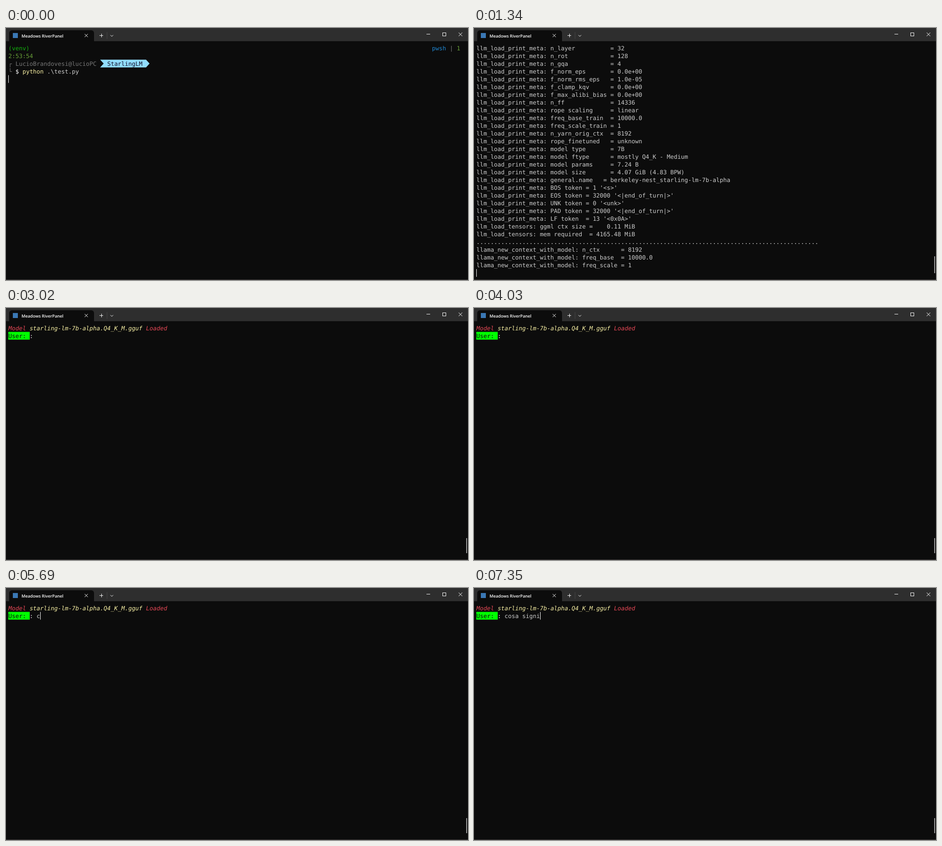
An HTML page with a canvas for the animation above (8000 ms loop, 1013x553 px).

```html
<!DOCTYPE html>
<html lang="en">
<head>
<meta charset="utf-8">
<title>Terminal</title>
<style>
html, body { margin: 0; width: 100%; height: 100%; overflow: hidden; background: #0c0c0c; }
canvas { display: block; width: 1013px; height: 553px; }
</style>
</head>
<body>
<canvas id="stage" width="1013" height="553"></canvas>
<script>
const ctx = document.getElementById('stage').getContext('2d');
const LOOP = 8000;
const LEFT = 5.2, TOP = 35.4, CELL = 7.74, ROW = 17.02;
const MONO = '12.856px "DejaVu Sans Mono", "Noto Sans Mono", monospace';
const BG = '#0c0c0c', FG = '#cccccc', GRAY = '#767676', RED = '#e74856',
      YELLOW = '#f9f1a5', OLIVE = '#689f38', SKY = '#91ddff';

const params = [
  'n_ctx_train=8192', 'n_embd=4096', 'n_head=32', 'n_head_kv=8', 'n_layer=32',
  'n_rot=128', 'n_gqa=4', 'f_norm_eps=0.0e+00', 'f_norm_rms_eps=1.0e-05',
  'f_clamp_kqv=0.0e+00', 'f_max_alibi_bias=0.0e+00', 'n_ff=14336',
  'rope scaling=linear', 'freq_base_train=10000.0', 'freq_scale_train=1',
  'n_yarn_orig_ctx=8192', 'rope_finetuned=unknown', 'model type=7B',
  'model ftype=mostly Q4_K - Medium', 'model params=7.24 B',
  'model size=4.07 GiB (4.83 BPW)'
].map(p => {
  const [key, value] = p.split('=');
  return key.padEnd(16) + ' = ' + value;
});
const tokens = [
  'general.name   = berkeley-nest_starling-lm-7b-alpha',
  "BOS token = 1 '<s>'",
  "EOS token = 32000 '<|end_of_turn|>'",
  "UNK token = 0 '<unk>'",
  "PAD token = 32000 '<|end_of_turn|>'",
  "LF token  = 13 '<0x0A>'"
];
const log = [
  ...[...params, ...tokens].map(s => 'llm_load_print_meta: ' + s),
  'llm_load_tensors: ggml ctx size =    0.11 MiB',
  'llm_load_tensors: mem required  = 4165.48 MiB',
  '.'.repeat(97),
  ...['n_ctx      = 8192', 'freq_base  = 10000.0', 'freq_scale = 1']
    .map(s => 'llama_new_context_with_model: ' + s)
];

const question = 'cosa signi';
const keys = [[5690, 1], [6020, 4], [6360, 6], [6690, 7], [7020, 9], [7350, 10]];
const blinks = [2030, 2340, 3020, 3360, 4030, 4710, 5040, 5690];

const colX = c => LEFT + c * CELL;
const rowY = r => TOP + r * ROW;

function rect(x, y, w, h, color) {
  ctx.fillStyle = color;
  ctx.fillRect(x, y, w, h);
}

function print(text, col, row, color = FG, style = '') {
  ctx.font = style + ' ' + MONO;
  ctx.fillStyle = color;
  ctx.fillText(text, colX(col), Math.round(rowY(row) + 13.4));
}

function cursor(col, row) {
  rect(Math.round(colX(col)), rowY(row), 1, ROW, '#ffffff');
}

function line(color, ...points) {
  ctx.strokeStyle = color;
  ctx.lineWidth = 1;
  ctx.beginPath();
  for (let i = 0; i < points.length; i += 2) ctx.lineTo(points[i], points[i + 1]);
  ctx.stroke();
}

function cross(x, y, r) {
  line('#ffffff', x - r, y - r, x + r, y + r);
  line('#ffffff', x + r, y - r, x - r, y + r);
}

function frameWindow() {
  rect(0, 0, 1013, 553, BG);
  rect(0, 0, 1013, 29, '#2e2e2e');
  ctx.fillStyle = BG;
  ctx.beginPath();
  ctx.roundRect(7, 5, 186, 24, [6, 6, 0, 0]);
  ctx.fill();
  rect(15, 11, 11, 11, '#3a78b5');

  ctx.font = '600 9.2px "Open Sans", "Noto Sans", sans-serif';
  ctx.fillStyle = '#ffffff';
  ctx.fillText('Meadows RiverPanel', 34, 21);
  cross(176, 16.5, 3.5);

  line('#ffffff', 205, 16.5, 213, 16.5);
  line('#ffffff', 209.5, 12.5, 209.5, 20.5);
  line('#454545', 221.5, 9, 221.5, 24);
  line('#ffffff', 229, 15.5, 232, 18.5, 235, 15.5);

  line('#ffffff', 922, 13.5, 930, 13.5);
  ctx.strokeRect(957.5, 10.5, 7, 7);
  cross(996.5, 14, 4);
  rect(0, 552, 1013, 1, '#453f3f');
}

function promptScreen() {
  print('(venv)', 0, 0, '#13b10e');
  print('pwsh', 120, 0, '#1f86d0');
  print('|', 125, 0, GRAY);
  print('1', 127, 0, OLIVE);
  print('2:53:54', 0, 1, OLIVE);
  print('┌ LucioBrandovesi@lucioPC', 0, 2, GRAY);

  const y = rowY(2), x1 = colX(26), x2 = colX(39);
  ctx.fillStyle = SKY;
  ctx.beginPath();
  ctx.moveTo(x1, y);
  ctx.lineTo(x2, y);
  ctx.lineTo(x2 + CELL, y + ROW / 2);
  ctx.lineTo(x2, y + ROW);
  ctx.lineTo(x1, y + ROW);
  ctx.lineTo(x1 + CELL, y + ROW / 2);
  ctx.fill();
  print('StarlingLM', 28, 2, '#100e23');

  print('└', 0, 3, GRAY);
  print('$', 2, 3, '#ffffff');
  print('python', 4, 3, YELLOW);
  print('.\\test.py', 11, 3);
  cursor(0, 4);
}

function logScreen(from, to) {
  log.slice(from, to).forEach((s, i) => print(s, 0, i));
}

function chatScreen(t) {
  print('Model', 0, 0, RED, 'italic');
  print('starling-lm-7b-alpha.Q4_K_M.gguf', 6, 0, YELLOW, 'italic');
  print('Loaded', 39, 0, RED, 'italic');
  rect(5, rowY(1), 47, ROW, '#00ff00');
  print('User:', 0, 1, BG);
  print(':', 6, 1, '#f2f2f2');

  const typed = keys.reduce((n, [at, count]) => t >= at ? count : n, 0);
  print(question.slice(0, typed), 8, 1);
  if (blinks.filter(at => t >= at).length % 2 === 0) cursor(8 + typed, 1);
}

function draw() {
  const t = performance.now() % LOOP;
  ctx.textRendering = 'geometricPrecision';
  frameWindow();
  if (t < 660) {
    promptScreen();
  } else if (t < 1340) {
    logScreen(0, 29);
  } else if (t < 1680) {
    logScreen(4);
    cursor(0, 29);
  } else {
    chatScreen(t);
  }
  if (t >= 660) {
    const y = t < 1680 ? 501 : 505;
    rect(1009, y, 2, 538 - y, '#a0a0a0');
  }
  requestAnimationFrame(draw);
}
draw();
</script>
</body>
</html>
```
